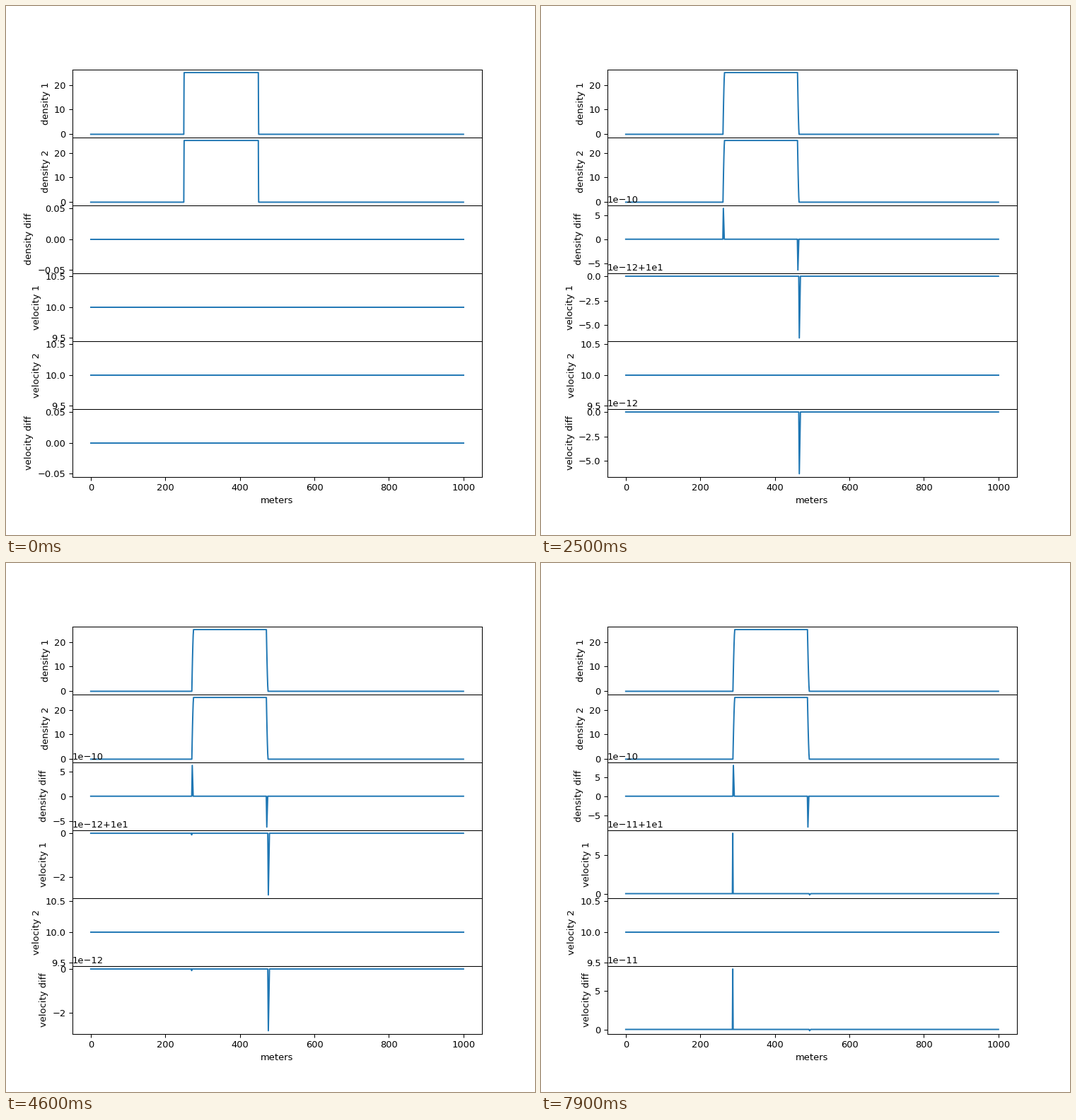
Animation of 748 by 748 pixels, one loop 8000 ms. Source, as a matplotlib script:

```python
import numpy as np
import matplotlib.pyplot as plt
from matplotlib.animation import FuncAnimation

FRAMES, STEP_MS = 80, 100
SPEED = 0.5              # metres per frame
LEFT, RIGHT = 250, 450   # initial edges of the density block
PEAK = 25

LABELS = [f"{name} {kind}" for name in ("density", "velocity")
          for kind in ("1", "2", "diff")]

plt.rcParams["font.family"] = "DejaVu Sans"
fig, axes = plt.subplots(6, 1, sharex=True, figsize=(8, 8), dpi=93.5,
                         gridspec_kw={"hspace": 0})
lines = []
for ax, label in zip(axes, LABELS):
    ax.set_ylabel(label)
    lines += ax.plot([0, 1000], [0, 0])
axes[-1].set_xlabel("meters")


def fronts(n):
    """Smear length and start of the rear and leading fronts."""
    smear = max(1, 5 * (n / FRAMES) ** 0.15)
    shift = n * SPEED - 0.4 * smear
    return smear, LEFT + shift, RIGHT + shift


def density(n):
    smear, rear, lead = fronts(n)
    u = np.linspace(0, 1, 6)
    rise = PEAK * (1 - (1 - u) ** 1.5)
    x = np.concatenate([[0], rear + smear * u, lead + smear * u, [1000]])
    y = np.concatenate([[0], rise, PEAK - rise, [0]])
    return x, y


def spikes(*peaks):
    """Flat line with triangles given as (centre, left width, right width, height)."""
    x, y = [0], [0]
    for c, wl, wr, h in peaks:
        x += [c - wl, c, c + wr]
        y += [0, h, 0]
    return np.array(x + [1000]), np.array(y + [0], float)


def density_diff(n):
    smear, rear, lead = fronts(n)
    swell = 5 + 0.04 * n + 0.7 * np.cos(2 * np.pi * (n - 18) / 48)
    amp = 1e-10 * swell * (1 - np.exp(-n / 5))
    return spikes((rear + 0.25 * smear, 1.4, 2.5, amp),
                  (lead + 0.25 * smear, 1.4, 2.5, -amp))


def velocity_error(n):
    smear, rear, lead = fronts(n)
    # the rear front reaches a new cell every fourth frame
    rear_amp = {2: -3 / (1 + np.exp((n - 22) / 4)),
                3: 3.65 + 0.053 * n}.get(n % 4, 0)
    lead_amp = -np.exp(np.interp(n, [0, 56, 66, 79],
                                 np.log([1.65, 0.193, 0.415, 0.17])))
    x, y = spikes((rear - 0.4, 1, 1, rear_amp),
                  (lead + 1.15 * smear, 1.5, 3, lead_amp))
    return x, y * 1e-11 * (n > 0)


def update(n):
    x, err = velocity_error(n)
    curves = [density(n), density(n), density_diff(n),
              (x, 10 + err), ([0, 1000], [10, 10]), (x, err)]
    for ax, line, curve in zip(axes, lines, curves):
        line.set_data(*curve)
        ax.relim()
        ax.autoscale_view()
    return lines


anim = FuncAnimation(fig, update, frames=FRAMES, interval=STEP_MS,
                     init_func=lambda: update(0), repeat=True, repeat_delay=0)
plt.show()
```
